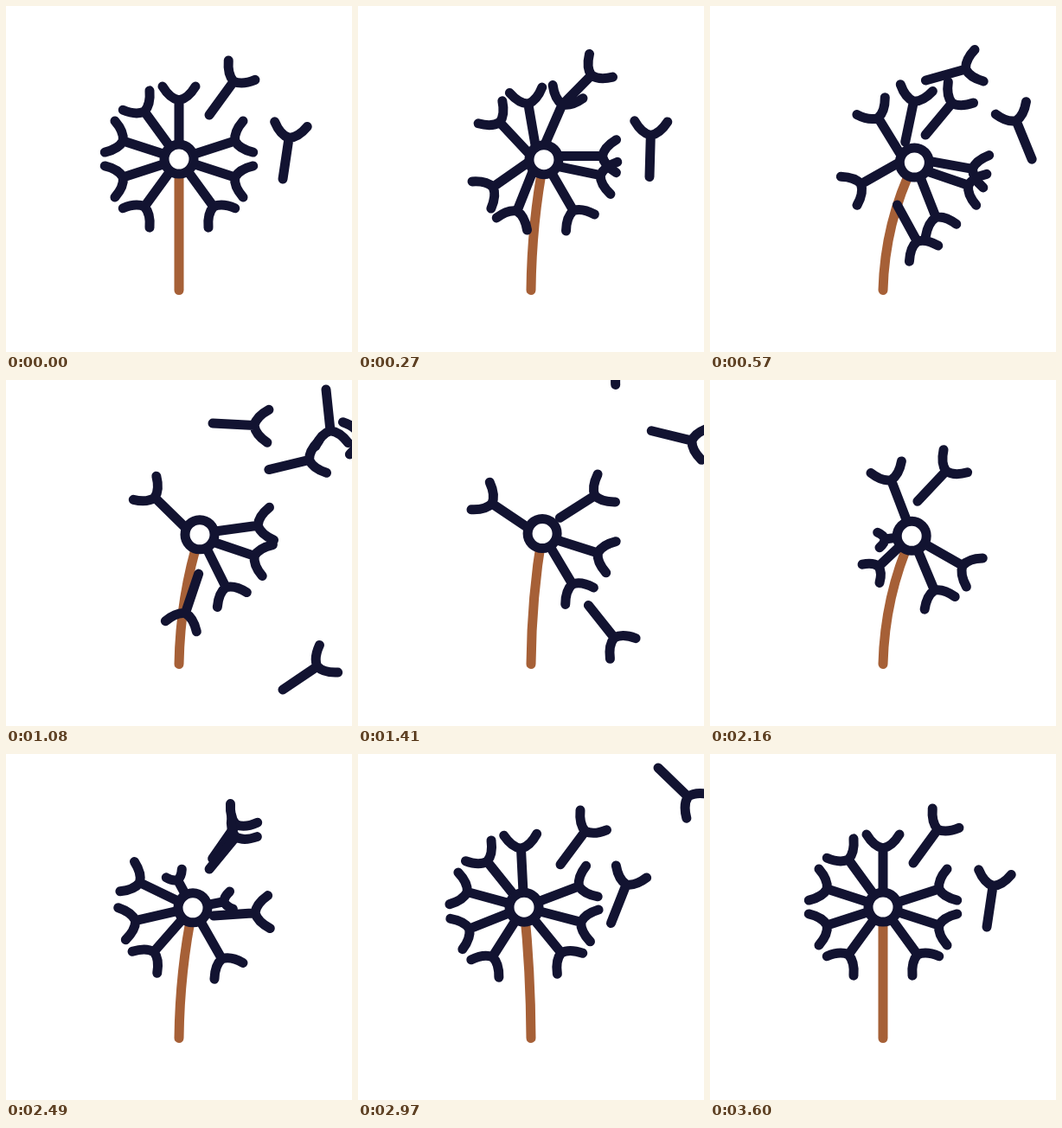
These frames come from a looping animation (400x400 px, 6.83 s). An HTML page:

```html
<!DOCTYPE html>
<html lang="en">
<head>
<meta charset="utf-8">
<title>Dandelion</title>
<style>
  html, body { margin: 0; width: 100%; height: 100%; overflow: hidden; background: #fff; }
  svg { display: block; width: 100%; height: 100%; }
  path, circle { fill: none; stroke: #121331; stroke-width: 11; stroke-linecap: round; stroke-linejoin: round; }
  #stem { stroke: #a66037; }
  #ring { fill: #fff; }
</style>
</head>
<body>
<svg viewBox="0 0 400 400">
  <path id="stem"/>
  <g id="seeds"></g>
  <circle id="ring" r="17"/>
</svg>
<script>
const LOOP = 6830, END = 3600, STEP = 30, GROWTH = 380;
const RIM = 20, STALK = 48, FORK = 16, SPREAD = 19;
const rad = Math.PI / 180;
const stem = document.getElementById('stem');
const ring = document.getElementById('ring');
const layer = document.getElementById('seeds');

const clamp = v => Math.min(1, Math.max(0, v));
const smooth = u => u * u * (3 - 2 * u);
const mix = (a, b, k) => a + (b - a) * k;

// Head position at its turning points, plus one point on the long way back.
const sway = [[0, 200], [620, 237], [1080, 224], [1395, 213], [1830, 243], [2490, 216], [2970, 192], [END, 200]];

// Monotone cubic curve through [time, value] points, at rest at both ends.
function curve(points, t) {
  const last = points.length - 1;
  let i = 0;
  while (i < last - 1 && points[i + 1][0] <= t) i++;
  const rate = k => (points[k + 1][1] - points[k][1]) / (points[k + 1][0] - points[k][0]);
  const slope = k => {
    if (k === 0 || k === last) return 0;
    const a = rate(k - 1), b = rate(k);
    return a * b <= 0 ? 0 : 2 * a * b / (a + b);
  };
  const [t0, v0] = points[i], [t1, v1] = points[i + 1];
  const span = t1 - t0, u = (t - t0) / span;
  return mix(v0, v1, smooth(u)) + span * u * (1 - u) * ((1 - u) * slope(i) - u * slope(i + 1));
}

function headAt(t) {
  const x = curve(sway, t), dx = x - 200;
  return { x, y: 177 + dx * dx / 330, tilt: dx * 0.4 };
}

// Wind: a quick rise, then a slow fade to calm.
function gust(t) {
  const u = t / 570;
  return 3.3 * u * Math.exp(-u) * (1 - t / END);
}

function addPath() {
  const p = document.createElementNS('http://www.w3.org/2000/svg', 'path');
  layer.append(p);
  return p;
}

function drawSeed(el, [x, y, angle], size = 1) {
  el.style.display = size > 0.02 ? '' : 'none';
  const cos = Math.cos(angle * rad) * size, sin = Math.sin(angle * rad) * size;
  const at = (f, s) => `${(x + f * cos - s * sin).toFixed(2)} ${(y + f * sin + s * cos).toFixed(2)}`;
  const tip = STALK + FORK, bow = STALK + 2;
  el.setAttribute('d', `M${at(0, 0)}L${at(STALK, 0)}M${at(tip, -SPREAD)}`
    + `Q${at(bow, -10.5)} ${at(STALK, 0)}Q${at(bow, 10.5)} ${at(tip, SPREAD)}`);
}

// Pose on the head: feet turn with it, loose seeds also bend downwind.
function held(home, loose, t, size = 1) {
  const head = headAt(t), foot = home + head.tilt;
  const bend = loose ? -Math.sign(home) * (12 + Math.abs(home) / 12) * gust(t) : 0;
  return [
    head.x + RIM * size * Math.cos(foot * rad),
    head.y + RIM * size * Math.sin(foot * rad),
    foot + bend
  ];
}

// Blown away through one pose at time `by`; `pow` shapes x, y and angle.
function blow(start, leave, by, pose, pow) {
  const el = addPath();
  return t => {
    const u = (t - leave) / (by - leave);
    if (u < 0 || u > 2) el.style.display = 'none';
    else drawSeed(el, start.map((v, i) => mix(v, pose[i], u ** pow[i])));
  };
}

// Drifts from the head to a resting pose, turning ahead of its travel.
function settle(home, leave, rest) {
  const el = addPath();
  return t => {
    const k = 1 - (1 - clamp((t - leave) / (END - leave))) ** 2.3;
    const from = held(home, true, t), ks = [k, k, Math.sqrt(k)];
    drawSeed(el, from.map((v, i) => mix(v, rest[i], ks[i])), t < leave ? 0 : 1);
  };
}

// A seed on the head; once it has left, a new one grows in its place.
function hold(home, leave = Infinity, grow = 0) {
  const el = addPath(), loose = leave < END;
  return t => {
    const size = t < leave ? 1 : smooth(clamp((t - grow) / GROWTH));
    drawSeed(el, held(home, loose, t, size), size);
  };
}

const blownOff = (home, leave, grow, by, pose, pow) =>
  [hold(home, leave, grow), blow(held(home, true, leave), leave, by, pose, pow)];
const settling = (home, leave, grow, rest) =>
  [hold(home, leave, grow), settle(home, leave, rest)];

const near = [235, 126, -54], far = [320, 200, -81.5];

const parts = [
  blownOff(-162, 1900, 2080, 2970, [347, 16, 44], [3.8, 1.9, 1.3]),
  blownOff(-126, 500, 2290, 1080, [239, 50, 3], [3, 1.5, 1]),
  blownOff(-90, 300, 2430, 1770, [378, -2, 45], [1, 1.7, 1.2]),
  settling(-18, 1055, 2290, near),
  settling(18, 2455, 2500, far),
  hold(54),
  blownOff(126, 300, 1900, 1080, [320, 358, -34], [2.1, 1.4, 1]),
  blownOff(162, 750, 1980, 1770, [388, 298, -18], [2.8, 0.9, 1.2]),
  blow(near, 0, 1080, [370, 11, 84], [3.5, 1.65, 2]),
  blow(far, 0, 1080, [456, 54, -192], [1.5, 2.9, 2])
].flat();

function render(t) {
  const { x, y } = headAt(t);
  stem.setAttribute('d', `M200 328.5Q${mix(200, x, 0.06)} 250 ${x} ${y}`);
  ring.setAttribute('cx', x);
  ring.setAttribute('cy', y);
  parts.forEach(draw => draw(t));
}

const start = performance.now();
function tick() {
  const t = (performance.now() - start) % LOOP;
  render(Math.min(END, Math.floor(t / STEP) * STEP));
  requestAnimationFrame(tick);
}
tick();
</script>
</body>
</html>
```
